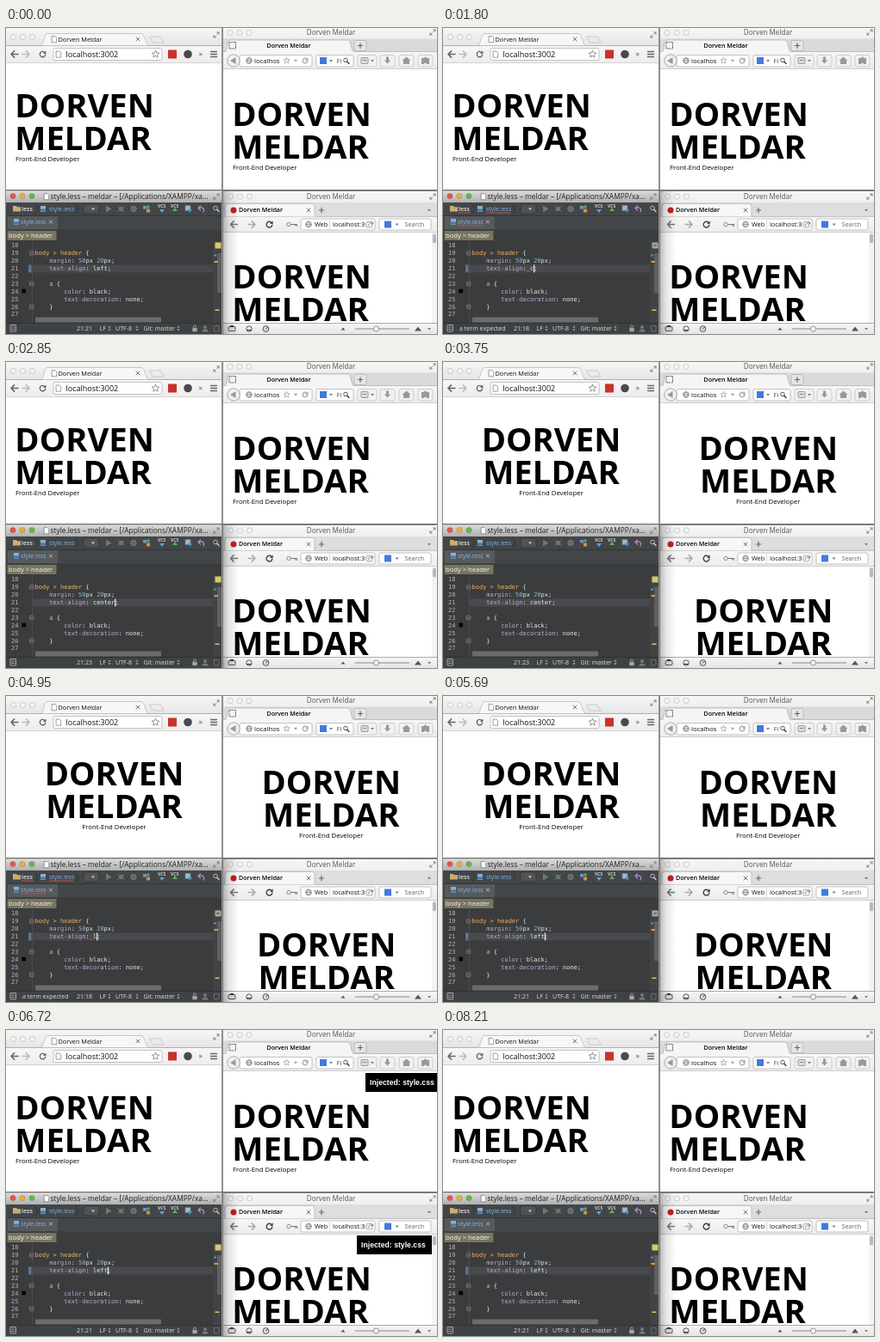
Animation, 500 px wide and 356 px high, one loop 8240 ms. Source, as an HTML page:

```html
<!DOCTYPE html>
<html lang="en">
<head>
<meta charset="utf-8">
<title>Live style injection</title>
<style>
html, body { margin: 0; width: 100%; height: 100%; overflow: hidden; background: #fff; }
svg { display: block; width: 100vw; height: 100vh; }
text { font-family: "Open Sans", "Noto Sans", sans-serif; white-space: pre; }
.code text { font: 7px "DejaVu Sans Mono", monospace; }
.note text { font: bold 8.7px "Liberation Sans", Arial, sans-serif; fill: #fff; }
.name { font-size: 38.3px; font-weight: 700; fill: #000; }
.line { fill: none; stroke-linecap: round; stroke-linejoin: round; }
</style>
</head>
<body>
<svg id="stage" viewBox="0 0 500 356" preserveAspectRatio="none"></svg>
<script>
const LOOP = 8240;
const CHAR = 7 * 0.602;
const CODE_X = 33.5;
const NAME = 'Dorven Meldar';
const [FIRST, LAST] = NAME.toUpperCase().split(' ');

// Drawing helpers, each returns SVG markup
const rect = (x, y, w, h, fill, more = '') =>
  `<rect x="${x}" y="${y}" width="${w}" height="${h}" fill="${fill}" ${more}/>`;
const box = (x, y, w, h, r, fill = '#fff', stroke = '#b4b4b4') =>
  rect(x, y, w, h, fill, `rx="${r}" stroke="${stroke}" stroke-width=".8"`);
const dot = (x, y, r, fill, stroke = 'none') =>
  `<circle cx="${x}" cy="${y}" r="${r}" fill="${fill}" stroke="${stroke}" stroke-width=".8"/>`;
const line = (d, stroke = '#777', w = 1) =>
  `<path class="line" d="${d}" stroke="${stroke}" stroke-width="${w}"/>`;
const shape = (d, fill) => `<path d="${d}" fill="${fill}"/>`;
const text = (x, y, s, size, fill = '#111', more = '') =>
  `<text x="${x}" y="${y}" font-size="${size}" fill="${fill}" ${more}>${s}</text>`;
const fade = (id, a, b) =>
  `<linearGradient id="${id}" x2="0" y2="1"><stop stop-color="${a}"/><stop offset="1" stop-color="${b}"/></linearGradient>`;
const clip = (id, x, y, w, h) =>
  `<clipPath id="${id}">${rect(x, y, w, h, '#000')}</clipPath>`;

const down = (x, y, fill = '#777', r = 2) => shape(`M${x - r} ${y - r / 2}h${2 * r}l${-r} ${r * 1.3}z`, fill);
const cross = (x, y, stroke = '#777', r = 2) =>
  line(`M${x - r} ${y - r}l${2 * r} ${2 * r}m0 ${-2 * r}l${-2 * r} ${2 * r}`, stroke);
const plus = (x, y, stroke = '#666') => line(`M${x - 2.7} ${y}h5.4m-2.7 -2.7v5.4`, stroke, 1.2);
const arrow = (x, y, dir, stroke) =>
  line(`M${x - 4 * dir} ${y}h${8 * dir}m${-3.6 * dir} -3.6l${3.6 * dir} 3.6l${-3.6 * dir} 3.6`, stroke, 1.6);
const reload = (x, y, stroke = '#666', r = 3.2) =>
  line(`M${x + r * .7} ${y - r * .7}a${r} ${r} 0 1 0 ${r * .3} ${r * .9}`, stroke, 1.4) +
  shape(`M${x + r + .8} ${y - r - .8}v3.6h-3.6z`, stroke);
const lens = (x, y, stroke) => dot(x, y, 2.3, 'none', stroke) + line(`M${x + 1.8} ${y + 1.8}l2.2 2.2`, stroke, 1.3);
const globe = (x, y) => dot(x, y, 3.3, '#eee', '#777') +
  line(`M${x - 3.3} ${y}h6.6m-3.3 -3.3c-2.4 2 -2.4 4.6 0 6.6c2.4 -2 2.4 -4.6 0 -6.6`, '#777', .6);
const star = (x, y, r, stroke) => {
  const pts = Array.from({ length: 10 }, (_, i) => {
    const a = i * Math.PI / 5, q = i % 2 ? r * .45 : r;
    return `${(x + q * Math.sin(a)).toFixed(2)},${(y - q * Math.cos(a)).toFixed(2)}`;
  });
  return `<polygon points="${pts.join(' ')}" fill="none" stroke="${stroke}" stroke-width=".8"/>`;
};
const page = (x, y) => {
  const d = `M${x - 2.5} ${y - 3.5}h3.4l1.8 1.8v5.4h-5.2z`;
  return shape(d, '#fff') + line(d, '#777', .7);
};
const expand = (x, y) =>
  line(`M${x + .8} ${y - .8}l2.2 -2.2m-2.2 0h2.2v2.2M${x - .8} ${y + .8}l-2.2 2.2m2.2 0h-2.2v-2.2`, '#777', .9);
const lights = (x, y, fills) => fills.map((f, i) => dot(x + i * 11, y, 3.1, f, '#0003')).join('');
const pale = Array(3).fill('#f4f4f4');
const title = y => text(377, y, NAME, 8.1, '#555', 'text-anchor="middle"');

function header(id, y) {
  return `<g id="${id}"><text class="name" y="${y}">${FIRST}</text>` +
    `<text class="name" y="${y + 37.8}">${LAST}</text>` +
    `<text class="sub" y="${y + 51}" font-size="7.75" fill="#000">Front-End Developer</text></g>`;
}

function note(x, y, w) {
  return `<g class="note">${rect(x, y, w, 22, '#000')}<text x="${x + 5}" y="${y + 14}">Injected: style.css</text></g>`;
}

function tabbedBrowser() {
  return rect(0, 0, 250, 20, 'url(#bar)') + lights(8.5, 10.5, pale) +
    shape('M40 20.5c4 0 4 -14 8 -14h109c4 0 5 14 9 14z', '#f7f7f7') +
    line('M0 20.5h40c4 0 4 -14 8 -14h109c4 0 5 14 9 14h84', '#bbb', .8) +
    page(56, 13) + text(60.5, 15.8, NAME, 7.3) + cross(153, 13) +
    shape('M167 10h12l4 7h-12z', '#ececec') + line('M167 10h12l4 7h-12z', '#bbb', .7) + expand(244, 8) +
    rect(0, 21, 250, 20, 'url(#tool)') + rect(0, 40.4, 250, .8, '#c4c4c4') +
    arrow(10, 30.5, -1, '#666') + arrow(23, 30.5, 1, '#bbb') + reload(42.5, 30.5) +
    box(55, 23.5, 126, 14, 2) + page(61, 30.5) + text(69.5, 33.5, 'localhost:3002', 9) +
    star(173.5, 30.5, 4.5, '#777') + rect(188, 25.5, 10, 10, '#c8322b') + dot(211, 30.5, 4.8, '#4a4a4a') +
    text(223.5, 33, '»', 9, '#555') + line('M237.5 27.5h7m-7 3h7m-7 3h7', '#666', 1.4) +
    rect(0, 41, 250, 147, '#fff') + header('pageA', 104.3);
}

function roundBrowser() {
  return rect(252, 0, 248, 28, 'url(#bar)') + lights(260, 5.5, pale) + title(8.4) + expand(495, 5) +
    rect(252, 12.5, 248, 15.5, '#dadada') +
    shape('M254 28c3 0 2 -14 6 -14h137c4 0 3 14 7 14z', '#f5f5f5') +
    line('M252 27.7h2c3 0 2 -13.7 6 -13.7h137c4 0 3 13.7 7 13.7h96', '#b2b2b2', .8) +
    `<rect x="259" y="16.5" width="7.5" height="7.5" fill="none" stroke="#444" stroke-dasharray="1.5 1"/>` +
    text(328, 22.8, NAME, 7.1, '#000', 'font-weight="600" text-anchor="middle"') +
    box(404, 14.5, 14, 12, 2, '#e6e6e6', '#b2b2b2') + plus(411, 20.5) +
    rect(252, 28, 248, 20, 'url(#tool)') + rect(252, 47.5, 248, .8, '#b0b0b0') +
    box(271, 31.5, 84, 13.5, 2) + dot(264, 38, 7.2, '#f0f0f0', '#999') + shape('M260 38l6.5 -4v8z', '#999') + globe(282, 38) +
    `<g clip-path="url(#urlB)">${text(288, 41, 'localhost', 7.7)}</g>` +
    star(325.5, 38, 3.6, '#999') + down(336, 38, '#aaa', 2.3) + reload(347, 38, '#aaa', 2.8) +
    box(360, 31.5, 43, 13.5, 2) + rect(364, 34, 8, 8, '#4479dc') + down(377, 38) +
    text(383.5, 41, 'Fi', 7.7, '#555') + lens(394, 37.5, '#333') +
    [[408, 22], [434, 17], [456, 17], [478, 17]].map(([x, w]) => box(x, 31.5, w, 13.5, 2, '#f1f1f1', '#c5c5c5')).join('') +
    box(412, 34.5, 8, 7, 1, '#ddd', '#888') + rect(414, 37, 4, 1, '#888') + down(425, 38) +
    shape('M441 33.5h3v4h2.3l-3.8 4l-3.8 -4h2.3z', '#999') +
    shape('M464.5 33.5l5 4.5h-1.5v4h-7v-4h-1.5z', '#999') +
    shape('M482 35h3a1.5 1.5 0 0 1 3 0h3v7h-3a1.5 1.5 0 0 0 -3 0h-3z', '#999') +
    rect(252, 48, 248, 140, '#fff') + header('pageB', 114);
}

function lowerBrowser() {
  return rect(252, 190, 248, 29, 'url(#bar)') + lights(260.5, 196, pale) + title(198.9) + expand(495, 196) +
    rect(252, 203, 248, 16, '#dedede') +
    shape('M254 219.5v-12a3 3 0 0 1 3 -3h98a3 3 0 0 1 3 3v12z', '#f7f7f7') +
    line('M252 219.3h2v-12a3 3 0 0 1 3 -3h98a3 3 0 0 1 3 3v12h142', '#b4b4b4', .8) +
    dot(264, 212, 3.5, '#c4201f') + text(270, 214.3, NAME, 7.1, '#000', 'font-weight="600"') +
    cross(351, 212) + plus(366, 212) + down(491, 212) +
    rect(252, 219.6, 248, 18.4, 'url(#tool)') + rect(252, 237.5, 248, .8, '#b0b0b0') +
    arrow(264.5, 228.5, -1, '#777') + arrow(285, 228.5, 1, '#aaa') + reload(305.5, 228.5, '#444', 3.4) +
    dot(328, 228.5, 2.2, 'none', '#777') + line('M330.500 228.500h7v2m-2 -2v1.500', '#777', 1.1) +
    box(342, 222, 86, 13, 2) + globe(351, 228.5) + text(358, 231.2, 'Web', 7.3) + rect(375, 223, .7, 11, '#ccc') +
    `<g clip-path="url(#urlC)">${text(379, 231.2, 'localhost:3002', 7.4)}</g>` +
    box(418, 225.5, 7, 6.5, 1, '#f4f4f4', '#999') + line('M420.500 230c0 -3 2 -3 5.500 -3m-1.500 -1.500l1.500 1.500l-1.500 1.500', '#777', .8) +
    box(433, 222, 60, 13, 2) + rect(439, 224.5, 8, 8, '#4479dc') + down(453.5, 228.5) + text(462.5, 231.2, 'Search', 7.2, '#666') +
    rect(252, 238, 248, 105, '#fff') + `<g clip-path="url(#viewC)">${header('pageC', 302.8)}</g>` +
    rect(494, 238, 6, 105, '#f3f3f3') + rect(495, 239.5, 4, 11, '#b8b8b8', 'rx="2"') +
    rect(252, 343, 248, 13, 'url(#bar)') + rect(252, 343, 248, .8, '#999') +
    box(258, 347.5, 8, 5, 1, '#ddd', '#333') + rect(260, 346, 4, 1.5, '#333') +
    dot(282, 350, 3.2, 'none', '#333') + line('M279.500 351.500h5', '#333', 1) +
    dot(301.5, 350, 3.4, '#ddd', '#333') + line('M301.500 350l1.700 -1.700', '#333') +
    shape('M388.5 351.5l2.500 -3l2.500 3z', '#555') + rect(405, 349.5, 63, 1, '#888') + dot(429.5, 350, 3, '#f8f8f8', '#777') +
    shape('M474 352.5l4 -5l4 5z', '#555') + down(491, 350);
}

const span = (s, fill) => `<tspan fill="${fill}">${s}</tspan>`;
const TAG = '#f0b260', PROP = '#c3a9d6', PLAIN = '#e6e8ea', BLUE = '#8fb9dd';
const decl = (prop, value) => span(prop, PROP) + span(': ', PLAIN) + value + span(';', PLAIN);
const px = n => span(n, BLUE) + span('px', PLAIN);
const source = [
  [0, ''],
  [0, span('body &gt; header ', TAG) + span('{', PLAIN)],
  [1, decl('margin', px(50) + ' ' + px(20))],
  [1, decl('text-align', `<tspan id="value" fill="${PLAIN}"></tspan>`)],
  [0, ''],
  [1, span('a ', TAG) + span('{', PLAIN)],
  [2, decl('color', span('black', PLAIN))],
  [2, decl('text-decoration', span('none', PLAIN))],
  [1, span('}', PLAIN)],
  [0, '']
];

function editor() {
  const rows = source.map(([depth, s], i) => {
    const y = 255.3 + i * 8.9;
    return text(6, y, 18 + i, 7, '#b4b6b8') + text(CODE_X + depth * 4 * CHAR, y, s, 7);
  }).join('');
  const fold = y => box(27.5, y - 2.2, 4.4, 4.4, .5, '#343638', '#84878a') + line(`M28.700 ${y}h2`, '#aaa', .7);
  const file = (x, y) => rect(x - 3, y - 3.5, 6, 7, '#8fb0c8') + rect(x - 3, y, 6, 3, '#3f78b5');
  const vcs = (x, fill, dir) => text(x - 5, 208.6, 'VCS', 5, '#d0d0d0', 'font-weight="700"') +
    shape(`M${x - 3} ${212 - dir}h6l-3 ${4 * dir}z`, fill);
  const pick = x => shape(`M${x - 1.6} 348.600l1.600 -2.200l1.600 2.200zm0 1.600l1.600 2.200l1.600 -2.200z`, '#aaa');
  const label = (x, s) => text(x, 351.8, s, 7.1, '#dcdedf');
  const squiggle = (x, y, w) => rect(x, y, w, 1, '#b9524b');
  return rect(0, 189, 250, 14, 'url(#active)') + lights(8, 195.5, ['#e8544c', '#eab03a', '#63b84a']) +
    page(47, 196) + text(51.5, 198.6, 'style.less – meldar – [/Applications/XAMPP/xa…', 8.4, '#222') + expand(244, 196) +
    rect(0, 203, 250, 32, '#434648') + rect(0, 218, 250, .7, '#2c2e2f') +
    shape('M8 207h4l1 1.200h4v5.300h-9z', '#c9ad72') + text(18, 212.6, 'less', 7.1, '#e4e4e4', 'font-weight="600"') +
    line('M34 205l3 5.500l-3 5.500', '#2c2e2f', .8) + file(43, 210.5) + text(50, 212.6, 'style.less', 7, '#83b5e8') +
    line('M81 205l3 5.500l-3 5.500', '#2c2e2f', .8) + box(90, 205, 18, 11, 2, '#505355', '#323435') + down(101, 210.5, '#ccc') +
    shape('M116 206.500l6.500 4l-6.500 4z', '#6e7a70') +
    dot(133.5, 210.5, 2.8, '#69746a') + line('M129.500 207.500l8 6m0 -6l-8 6', '#69746a', .8) +
    dot(148, 210.5, 3.2, '#62676a', '#7d8183') +
    shape('M159 207h4v3.500h-4z', '#6b99c8') + shape('M163 210.500h4v4h-4z', '#cf9148') + dot(165, 208, 1.7, '#65a860') +
    vcs(181, '#58a2e0', 1) + vcs(196, '#62b05a', -1) +
    box(208, 206.5, 6, 6, .5, '#9db9d0', '#71838f') + shape('M211 211h5l-2.500 4z', '#4a92d4') +
    line('M229 214c2 -5 -2 -6 -6 -4.500m2.500 -2.500l-2.500 2.500l2.500 2.500', '#b48ad0', 1.3) + lens(243, 209.5, '#d0d0d0') +
    rect(2, 219, 58, 15.5, '#565a5d') + file(12, 225.5) + text(17, 227.6, 'style.less', 7.1, '#83b5e8') + cross(52, 225.5, '#bbb', 1.6) +
    rect(0, 234.5, 250, 108.5, '#3b3c3d') +
    rect(1.5, 236, 57, 11, '#77745f') + text(3, 243.6, 'body &gt; header', 7.6, '#fbf9ea') +
    rect(30, 248, .6, 95, '#55585a') + rect(30.6, 275.5, 209.4, 8.9, '#484a4d') +
    rect(240, 248, 10, 95, '#414345') + rect(245, 262, 5, 46, '#5e6062') +
    rect(34, 336.5, 146, 6, '#6a6b6c', 'rx="1"') +
    `<g class="code">${rows}</g>` + fold(262) + fold(297.5) + fold(324.3) +
    rect(18.5, 303.7, 4.6, 4.6, '#000') +
    rect(26, 275.5, 3.6, 8.9, '#5a7590', 'id="changed"') +
    `<g id="error">${squiggle(CODE_X + 15 * CHAR, 282.5, CHAR)}${squiggle(18, 214.5, 14)}${squiggle(50, 214.5, 28)}${squiggle(17, 229.5, 29)}</g>` +
    rect(0, 275.5, 1.1, 8.9, '#fff', 'id="caret"') +
    `<g id="ok">${rect(242.5, 249.5, 7, 7, '#d6cb62')}</g>` +
    `<g id="busy">${box(243, 250, 6, 6, .5, '#99998f', '#c8c8c0')}${line('M244.500 253h3', '#555', 1)}</g>` +
    rect(241, 263.5, 3, 2, '#5c8fc4') + rect(241.5, 271, 4.5, 2, '#e09a3e') + rect(242.5, 327.5, 5, 1.5, '#d6cb62') +
    rect(0, 343, 250, 13, '#3f4244') + rect(0, 343, 250, .7, '#2b2d2e') +
    box(5, 345.5, 6.5, 7.5, .5, 'none', '#c0c2c4') + line('M6.500 348h3.500m-3.500 2.500h3.500', '#c0c2c4', .7) +
    `<g id="message">${label(19, 'a term expected')}</g><text id="place" x="82" y="351.800" font-size="7.100" fill="#dcdedf"></text>` +
    label(108.5, 'LF') + pick(120) + label(127, 'UTF-8') + pick(152) + label(159.5, 'Git: master') + pick(200) +
    box(216.5, 349, 5, 4, .5, '#aaa', '#888') + line('M217.500 349v-1.500a1.500 1.500 0 0 1 3 0', '#aaa', .9) +
    dot(231, 348, 2, '#777a7c') + shape('M227.500 353.500a3.500 3 0 0 1 7 0z', '#777a7c') +
    box(241.5, 346.5, 5.5, 6.5, .5, 'none', '#777a7c');
}

const stage = document.getElementById('stage');
stage.innerHTML = '<defs>' + fade('bar', '#f6f6f6', '#e6e6e6') + fade('tool', '#f6f6f6', '#ececec') + fade('active', '#dcdcdc', '#b0b0b0') +
  '<linearGradient id="shade"><stop stop-opacity=".32"/><stop offset=".4" stop-opacity=".11"/><stop offset="1" stop-opacity="0"/></linearGradient>' +
  clip('urlB', 286, 30, 31.5, 16) + clip('urlC', 378, 220, 38.5, 18) + clip('viewC', 252, 238, 242, 105) + '</defs>' +
  rect(0, 0, 500, 356, '#8a8785') + tabbedBrowser() + roundBrowser() + lowerBrowser() +
  rect(250, 190, 20, 166, 'url(#shade)') + editor() +
  `<g id="notes">${note(417, 50, 83)}${note(407, 239, 87)}</g>` +
  rect(250, 0, 1.5, 356, '#98908e') + rect(0, 188, 500, 1.3, '#77706e');

const $ = id => document.getElementById(id);
const show = (id, on) => $(id).setAttribute('visibility', on ? 'visible' : 'hidden');
const within = (t, ...spans) => spans.some(([a, b]) => t >= a && t < b);

const typing = [
  [0, 'left'], [1200, ''], [1800, 'c'], [1950, 'ce'], [2100, 'cent'], [2250, 'cente'], [2400, 'center'],
  [4650, ''], [4950, 'l'], [5100, 'le'], [5250, 'lef'], [5540, 'left']
];
const pages = [['pageA', 10.3, 125.5], ['pageB', 262.3, 377.3], ['pageC', 262.3, 371.7]];

function align(centred) {
  for (const [id, left, mid] of pages) {
    for (const el of $(id).children) {
      const start = left + (el.classList.contains('sub') ? .7 : 0);
      el.setAttribute('x', centred ? mid : start);
      el.setAttribute('text-anchor', centred ? 'middle' : 'start');
    }
  }
}

function draw(t) {
  const word = typing.filter(([at]) => at <= t).pop()[1];
  const failing = within(t, [1650, 2850], [4650, 5690]);
  const busy = failing || within(t, [5690, 5830]);
  $('value').textContent = word;
  $('place').textContent = '21:' + (17 + word.length);
  $('caret').setAttribute('x', CODE_X + (16 + word.length) * CHAR);
  show('caret', within(t, [300, 750], [1200, 3750], [4350, 6280], [6720, 7320], [7770, 8210]));
  show('changed', word !== 'center');
  show('error', failing);
  show('message', failing);
  show('busy', busy);
  show('ok', !busy);
  show('notes', within(t, [3000, 3750], [5830, 6870]));
  align(within(t, [3000, 5830]));
}

const began = performance.now();
function tick() {
  draw((performance.now() - began) % LOOP);
  requestAnimationFrame(tick);
}
tick();
</script>
</body>
</html>
```
